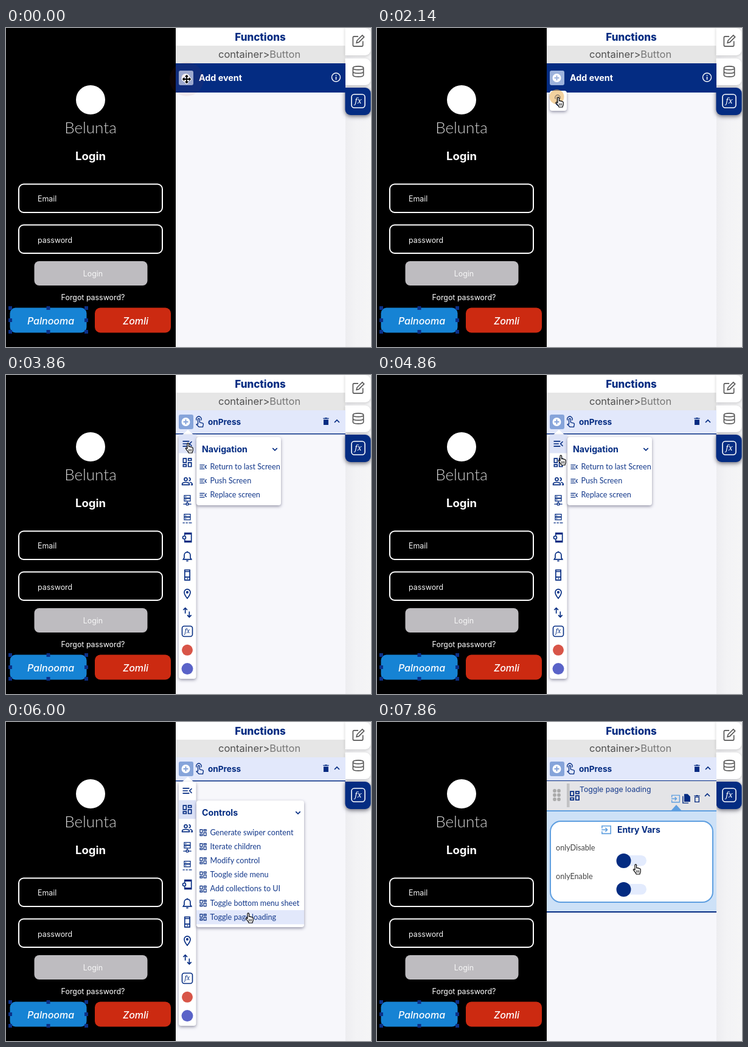
An HTML page with a canvas for the animation above (8 s loop, 600 by 524 pixels).

```html
<!DOCTYPE html>
<html lang="en">
<head>
<meta charset="utf-8">
<title>Functions panel</title>
<style>
html, body { margin: 0; width: 100%; height: 100%; overflow: hidden; background: #000; }
canvas { display: block; width: 600px; height: 524px; }
</style>
</head>
<body>
<canvas id="stage" width="600" height="524"></canvas>
<script>
const ctx = document.getElementById('stage').getContext('2d');
const LOOP = 8000, TICK = 1000 / 7;
const NAVY = '#042c82', SKY = '#5f9fe0', PALE = '#e2e8fb';
const SANS = 'Inter, sans-serif', LATO = 'Lato, sans-serif';

// 24-unit icons; w is the line width, 0 means filled
const icons = {
  nav: { w: 2, d: 'M3 7H16M3 12H13M3 17H16M21 7.5L16.5 12L21 16.5' },
  grid: { w: 2, d: 'M4 4h6v8H4zM14 4h6v4h-6zM14 12h6v8h-6zM4 16h6v4H4z' },
  group: { w: 2, d: 'M12 8a3 3 0 1 1-6 0a3 3 0 1 1 6 0M2 19v-2c1-4 13-4 14 0v2zM15 5a3 3 0 0 1 0 6M17 14c4 .5 5 2 5 5h-3' },
  server: { w: 1.5, d: 'M6 3h12v5H6zM6 9h12v5H6zM12 14v5M4 20h6M14 20h6M10 18h4v4h-4zM8 5.5h2M8 11.5h2' },
  dots: { w: 1.5, d: 'M6 3h12v5H6zM6 9h12v5H6zM8 5.5h2M8 11.5h2M3 20h4M9 20h4M15 20h6' },
  device: { w: 2, d: 'M7 8V3h13v18H7v-5M9 12a3 3 0 1 1-6 0a3 3 0 1 1 6 0M7 5h13M7 19h13' },
  bell: { w: 2, d: 'M4 18h16l-2-3V10c0-8-12-8-12 0v5zM10 21h4M12 2v2' },
  phone: { w: 2, d: 'M7 2h10v20H7zM7 5h10M7 16h10M11 19h2' },
  pin: { w: 2, d: 'M12 21C8 16 6 12 6 9a6 6 0 0 1 12 0c0 3-2 7-6 12zM13.5 9a1.5 1.5 0 1 1-3 0a1.5 1.5 0 1 1 3 0' },
  swap: { w: 2, d: 'M8 14V3M4 7l4-4 4 4M16 10v11M12 17l4 4 4-4' },
  touch: { w: 1.6, d: 'M9 17V7a1.7 1.7 0 0 1 3.4 0v6l6 1.6c1 .3 1.5 1 1.3 2L18.600 22H11l-5-5c1-1.200 2-.7 3 0M6.500 9a5 5 0 1 1 8.500 0' },
  trash: { w: 0, d: 'M6 8h12v13H6zM5 4h4l1-1h4l1 1h4v2H5z' },
  bin: { w: 2, d: 'M7 8h10v12H7zM5 5h14M10 4h4' },
  copy: { w: 0, d: 'M3 6h2v15h12v2H3zM7 1h8l6 6v12H7z' },
  entry: { w: 2, d: 'M3 9V4h18v16H3v-5M2 12h12M10 8l4 4-4 4' },
  up: { w: 2.6, d: 'M6 15l6-6 6 6' },
  down: { w: 2.6, d: 'M6 9l6 6 6-6' },
  pencil: { w: 1.7, d: 'M12 4H5Q3 4 3 6v13q0 2 2 2h13q2 0 2-2v-7M9 15l1-4 9-9 3 3-9 9z' },
  data: { w: 1.7, d: 'M3 6c0-4 18-4 18 0v12c0 4-18 4-18 0zM3 6c0 4 18 4 18 0M3 12c0 4 18 4 18 0' }
};
for (const k in icons) icons[k].path = new Path2D(icons[k].d);

const hand = new Path2D('M0 1.300C0-.6 2.400-.6 2.600 1.300V6C3.200 5.200 4.800 5.400 5 6.400 5.600 5.600 7 5.900 7.200 7 8 6.400 9.200 7 9.200 8.200V11.500C9.200 13.500 8 14 8 16H2.200C2 14-1.500 11-2.600 9-3 8-1.600 7.200-.6 8.400L0 9z');
const arrow = new Path2D('M0 0V14L3.300 11L5.600 16.500L8 15.400L5.700 10.200H10z');
const cross = new Path2D('M-6 0H6M0-6V6M-4-2L-6 0L-4 2M4-2L6 0L4 2M-2-4L0-6L2-4M-2 4L0 6L2 4');

const track = [
  [0, 297, 84], [1000, 296, 84], [1290, 296, 84], [1860, 297, 114], [2290, 297, 114],
  [2710, 292.5, 70], [3430, 292.5, 70], [3860, 298, 112], [4570, 298, 112], [4857, 301, 132],
  [5000, 299, 143], [5290, 300, 146], [5710, 385, 250], [6000, 397, 314], [6860, 397, 312],
  [7290, 410, 270], [7857, 424, 234], [8000, 424, 234]
];
const rail = ['nav', 'grid', 'group', 'server', 'dots', 'device', 'bell', 'phone', 'pin', 'swap'];
const menus = {
  nav: { title: 'Navigation', y: 102, w: 139, h: 112, items: ['Return to last Screen', 'Push Screen', 'Replace screen'] },
  grid: {
    title: 'Controls', y: 129, w: 177, h: 208,
    items: ['Generate swiper content', 'Iterate children', 'Modify control', 'Toogle side menu',
      'Add collections to UI', 'Toggle bottom menu sheet', 'Toggle page loading']
  }
};

const clamp = v => Math.max(0, Math.min(1, v));
const smooth = v => (v = clamp(v), v * v * (3 - 2 * v));
const within = (t, a, b) => t >= a && t < b;

function pointer(t) {
  const i = Math.max(1, track.findIndex(k => k[0] >= t));
  const [t0, x0, y0] = track[i - 1], [t1, x1, y1] = track[i];
  const k = smooth((t - t0) / (t1 - t0));
  return { x: x0 + (x1 - x0) * k, y: y0 + (y1 - y0) * k };
}

function rect(x, y, w, h, color) {
  ctx.fillStyle = color;
  ctx.fillRect(x, y, w, h);
}

function box(x, y, w, h, r, fill, line, lw = 2) {
  ctx.beginPath();
  ctx.roundRect(x, y, w, h, r);
  if (fill) { ctx.fillStyle = fill; ctx.fill(); }
  if (line) { ctx.strokeStyle = line; ctx.lineWidth = lw; ctx.stroke(); }
}

function disc(x, y, r, color) {
  ctx.beginPath();
  ctx.arc(x, y, r, 0, 7);
  ctx.fillStyle = color;
  ctx.fill();
}

function text(s, x, y, font, color, align = 'left') {
  ctx.font = font;
  ctx.fillStyle = color;
  ctx.textAlign = align;
  ctx.fillText(s, x, y);
}

function icon(name, x, y, size, color = NAVY) {
  const { path, w } = icons[name];
  ctx.save();
  ctx.translate(x - size / 2, y - size / 2);
  ctx.scale(size / 24, size / 24);
  ctx.strokeStyle = ctx.fillStyle = color;
  ctx.lineWidth = w;
  w ? ctx.stroke(path) : ctx.fill(path);
  ctx.restore();
}

function fx(x, y, size, color) {
  box(x - size / 2, y - size / 2, size, size, size / 5, null, color, 1.6);
  text('fx', x, y + size * .2, `italic ${size * .6}px "Noto Serif", serif`, color, 'center');
}

function shadow(blur, dy, color, draw) {
  ctx.save();
  ctx.shadowBlur = blur;
  ctx.shadowOffsetY = dy;
  ctx.shadowColor = color;
  draw();
  ctx.restore();
}

function card(x, y, w, h) {
  shadow(5, 2, 'rgba(0,0,40,.4)', () => box(x, y, w, h, 4, '#fff'));
}

function phone() {
  rect(0, 0, 279, 524, '#000');
  disc(139, 118, 24, '#fff');
  text('Belunta', 139, 173, '300 26px ' + LATO, '#d6d6d6', 'center');
  text('Login', 139, 217, '700 18.5px ' + SANS, '#fff', 'center');
  box(21, 256.500, 236, 46.500, 8, null, '#fff');
  box(21, 323.500, 236, 46.500, 8, null, '#fff');
  const body = '12.4px ' + SANS;
  text('Email', 52, 285, body, '#f2f2f2');
  text('password', 52, 353, body, '#f2f2f2');
  box(46.500, 383, 186, 40, 8, '#bebcc0');
  text('Login', 143, 408, body, '#f7f7f7', 'center');
  text('Forgot password?', 143, 447, body, '#fff', 'center');
  box(6.500, 459.500, 126, 41, 9, '#1683d4');
  box(146, 459.500, 125, 41, 9, '#cc2a11');
  const label = 'italic 500 16px ' + SANS;
  text('Palnooma', 73.500, 486.500, label, '#fff', 'center');
  text('Zomli', 213, 486.500, label, '#fff', 'center');
  for (const x of [7, 69.500, 132])
    for (const y of [460, 480, 499])
      if (x !== 69.500 || y !== 480) rect(x - 3, y - 3, 6, 6, '#0b3087');
}

function tabs() {
  const g = ctx.createLinearGradient(558, 0, 600, 0);
  g.addColorStop(0, '#ededf0');
  g.addColorStop(.4, '#f3f3f5');
  g.addColorStop(1, '#f5f5f6');
  rect(558, 0, 42, 524, g);
  [['pencil', 0, 45], ['data', 50, 44]].forEach(([name, y, h]) => {
    shadow(4, 1, 'rgba(0,0,0,.2)', () => box(557.500, y, 42, h, [0, 9, 9, 0], '#fff'));
    icon(name, 579, y + 21.500, 23, '#555');
  });
  shadow(7, 2, 'rgba(0,0,20,.6)', () => box(557.500, 98, 42, 45, [0, 9, 9, 9], NAVY));
  fx(579, 120, 22, '#fff');
}

function panel() {
  rect(279, 0, 279, 524, '#f7f7fb');
  rect(279, 0, 279, 29, '#fff');
  text('Functions', 418, 21, '800 17px ' + SANS, NAVY, 'center');
  rect(279, 29, 279, 29, '#e6e6e6');
  const font = '16.5px ' + SANS;
  text('container>', 349, 49, font, '#505050');
  const w = ctx.measureText('container>').width;
  text('Button', 349 + w, 49, font, '#777');
}

function plus(y, tone, ink) {
  box(284, y - 12, 24, 24, 3, tone);
  disc(295.500, y, 7, '#fff');
  rect(291.500, y - 1, 8, 2, ink);
  rect(294.500, y - 4, 2, 8, ink);
}

function eventRow(t) {
  rect(279, 58, 279, 48, NAVY);
  plus(82, '#9db3dc', '#9db3dc');
  text('Add event', 317, 87, '700 14.3px ' + SANS, '#fff');
  ctx.beginPath();
  ctx.arc(542.500, 81, 7, 0, 7);
  ctx.strokeStyle = '#fff';
  ctx.lineWidth = 1.4;
  ctx.stroke();
  rect(541.800, 80, 1.500, 5, '#fff');
  rect(541.800, 77, 1.500, 1.600, '#fff');
  const k = smooth((t - 915) / 300);
  if (!k) return;
  card(284, 103, 28, 33 * k);
  if (k > .8) icon('touch', 298, 119, 20);
}

function pressRow() {
  rect(279, 58, 279, 39, PALE);
  rect(279, 96, 279, 1.500, NAVY);
  plus(77, '#86a4da', '#86a4da');
  icon('touch', 318, 77, 20);
  text('onPress', 332, 82, '700 13.6px ' + SANS, NAVY);
  icon('trash', 526, 76, 16);
  icon('up', 544, 76, 16);
}

function railMenu(active) {
  ctx.beginPath();
  ctx.moveTo(290, 98);
  ctx.lineTo(299, 90);
  ctx.lineTo(308, 98);
  ctx.fillStyle = '#fff';
  ctx.fill();
  card(284, 98, 28.500, 401);
  const at = i => 113 + i * 30.8;
  rail.forEach((name, i) => {
    if (name === active) rect(284, at(i) - 15.400, 28.500, 30.800, '#dde3f7');
    icon(name, 298, at(i), 20);
  });
  fx(298, at(10), 17, NAVY);
  disc(298, at(11), 9, '#d85548');
  disc(298, at(12), 9.500, '#5a63c8');
}

function submenu(key, p) {
  const { title, y, w, h, items } = menus[key];
  card(313, y, w, h);
  text(title, 322, y + 25, '700 14.2px ' + SANS, NAVY);
  icon('down', 313 + w - 10, y + 20, 15);
  items.forEach((s, i) => {
    const cy = y + 49 + i * 23.2 + (key === 'grid' ? 3.500 : 0);
    if (key === 'grid' && p.x > 313 && Math.abs(p.y + 4 - cy) < 11.6) rect(313, cy - 11.600, w, 23.200, PALE);
    icon(key, 324, cy, 15);
    text(s, 335.500, cy + 4, '12.6px ' + LATO, '#153a8c');
  });
}

function entryPanel(hover) {
  rect(279, 97, 279, 49, hover ? '#e4e4e7' : '#fff');
  for (let i = 0; i < 6; i++) disc(292 + i % 2 * 7, 113 + (i >> 1) * 7, 2.900, '#aaa');
  rect(312, 101, 4.500, 39, '#c2c2c4');
  icon('grid', 325, 121, 21);
  text('Toggle page loading', 333, 115, '12.2px ' + SANS, '#153a8c');
  icon('up', 543, 120, 16);
  rect(279, 145, 279, 2, SKY);
  rect(279, 147, 279, 165, '#cde1f7');
  if (hover) {
    icon('entry', 491, 126, 17, SKY);
    icon('copy', 508.500, 126, 17);
    icon('bin', 526, 126, 16);
    ctx.beginPath();
    ctx.moveTo(483, 146);
    ctx.lineTo(492, 136);
    ctx.lineTo(501, 146);
    ctx.fillStyle = SKY;
    ctx.fill();
  }
  rect(279, 311, 279, 2, NAVY);
  box(285, 163, 267, 133, 17, '#fff', SKY);
  icon('entry', 377, 177, 19, SKY);
  text('Entry Vars', 395, 182, '700 13.9px ' + SANS, NAVY);
  [['onlyDisable', 228], ['onlyEnable', 275]].forEach(([s, y]) => {
    text(s, 294, y - 17, '12.6px ' + LATO, '#444');
    box(400, y - 9, 43, 17.500, 8.750, '#e3ebfd');
    disc(405.500, y, 12, NAVY);
  });
}

function ripples(t, p) {
  if (t < 850) disc(297, 84, 28, 'rgba(170,60,60,.08)');
  if (within(t, 850, 1140)) {
    disc(296, 84, 24, 'rgba(135,135,135,.72)');
    box(284, 72, 24, 23, 3, 'rgba(110,115,125,.6)');
    disc(296, 82, 9, '#e3bc8c');
  }
  if (within(t, 2140, 2430) || within(t, 3280, 3560) || within(t, 6140, 6420))
    disc(p.x - 1.5, p.y - 1, 12, 'rgba(235,180,95,.6)');
}

function cursor(t, p) {
  ctx.save();
  ctx.translate(p.x, p.y);
  ctx.lineJoin = 'round';
  if (t < 850) {
    for (const [color, w] of [['#fff', 4], ['#000', 1.8]]) {
      ctx.strokeStyle = color;
      ctx.lineWidth = w;
      ctx.stroke(cross);
    }
  } else {
    const pointing = within(t, 6420, 7700);
    const shape = pointing ? arrow : hand;
    ctx.fillStyle = pointing ? '#000' : '#fff';
    ctx.strokeStyle = pointing ? '#fff' : '#000';
    ctx.lineWidth = 1.2;
    ctx.fill(shape);
    ctx.stroke(shape);
    if (!pointing) for (let i = 0; i < 3; i++) rect(2.2 + i * 1.9, 9.500, .8, 4, '#000');
  }
  ctx.restore();
}

function draw(t) {
  const p = pointer(t);
  phone();
  panel();
  tabs();
  if (t < 2420) eventRow(t); else pressRow();
  if (within(t, 3420, 6280)) {
    const active = t < 3850 ? '' : t < 4990 ? 'nav' : 'grid';
    ctx.globalAlpha = smooth((t - 3300) / 250);
    railMenu(active);
    ctx.globalAlpha = 1;
    if (active) submenu(active, p);
  }
  if (t >= 6280) entryPanel(t >= 7130);
  ripples(t, p);
  cursor(t, p);
}

function frame(now) {
  const t = now % LOOP;
  draw(Math.floor((t + 6) / TICK) % 56 * TICK);
  requestAnimationFrame(frame);
}
requestAnimationFrame(frame);
</script>
</body>
</html>
```
